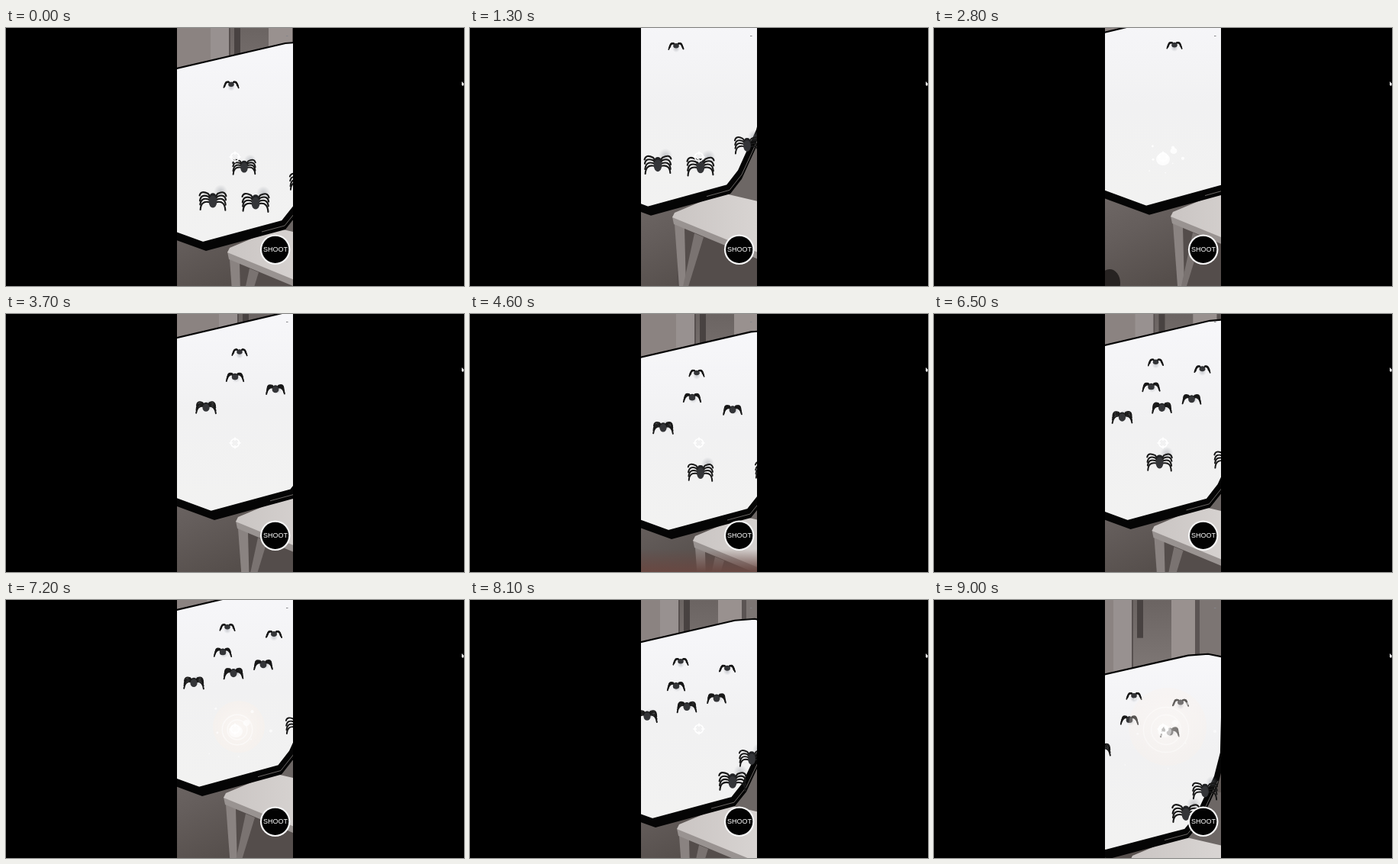
An HTML page with a canvas that plays this animation: 600 by 338 pixels, repeating every 9100 ms.

```html
<!DOCTYPE html>
<html lang="en">
<head>
<meta charset="utf-8">
<title>Spider shoot</title>
<style>
html, body { margin: 0; width: 100%; height: 100%; overflow: hidden; background: #000; }
canvas { display: block; }
</style>
</head>
<body>
<canvas id="stage" width="600" height="338"></canvas>
<script>
const ctx = document.getElementById('stage').getContext('2d');
const LOOP = 9100, STEP = 100;
const AIM = { x: 300, y: 169 };
const INK = '#050505';

// The scene stands still; the hand-held camera pans over it.
const pan = [
  { t: 0, x: 0, y: 0 },
  { t: 1300, x: -25, y: -46 },
  { t: 2800, x: 20, y: -47 },
  { t: 4600, x: 2, y: 3 },
  { t: 5800, x: -4, y: 15 },
  { t: 7200, x: -5, y: -35 },
  { t: 9000, x: -33, y: 47 }
];

const spider = (x, y, from = 0, to = LOOP) => ({ x, y, from, to });
const spiders = [
  spider(295, 74),
  spider(289, 106, 3200),
  spider(342, 122, 3500),
  spider(356, 83, 4900),
  spider(303, 133, 5200, 8700),
  spider(251, 145, 3000),
  spider(312, 181, 0, 600),
  spider(388, 200),
  spider(300, 203, 3800, 7000),
  spider(271, 225, 0, 2700),
  spider(327, 227, 0, 1600),
  spider(363, 230, 8000)
].sort((a, b) => a.y - b.y);
const hits = spiders.map(s => s.to);

const mix = (a, b, u) => a + (b - a) * u;

function camera(t) {
  const i = Math.max(1, pan.findIndex(k => k.t >= t));
  const a = pan[i - 1], b = pan[i], u = (t - a.t) / (b.t - a.t);
  return { x: mix(a.x, b.x, u), y: mix(a.y, b.y, u) };
}

// Far parts of the table slide a little more than near ones.
const place = (cam, x, y) => [x + cam.x, y + cam.y * (1.13 - y * .00045)];

function path(pts, close = true) {
  ctx.beginPath();
  pts.forEach(([x, y], i) => i ? ctx.lineTo(x, y) : ctx.moveTo(x, y));
  if (close) ctx.closePath();
}
function poly(fill, ...pts) { path(pts); ctx.fillStyle = fill; ctx.fill(); }
function rect(fill, x, y, w, h) { ctx.fillStyle = fill; ctx.fillRect(x, y, w, h); }
function oval(fill, x, y, rx, ry = rx) {
  ctx.beginPath();
  ctx.ellipse(x, y, rx, ry, 0, 0, 7);
  ctx.fillStyle = fill;
  ctx.fill();
}
function fade(x0, y0, x1, y1, ...colors) {
  const g = ctx.createLinearGradient(x0, y0, x1, y1);
  colors.forEach((c, i) => g.addColorStop(i / (colors.length - 1), c));
  return g;
}
function glow(x, y, r, color, clear) {
  const g = ctx.createRadialGradient(x, y, 0, x, y, r);
  g.addColorStop(0, color);
  g.addColorStop(1, clear);
  oval(g, x, y, r);
}

function drawWall(cam) {
  const seam = 294 + cam.x;
  rect('#8b8381', 224, 0, 152, 110);
  rect('#989190', seam - 26, 0, 24, 110);
  rect(fade(0, 0, 0, 85, '#6b6462', '#7d7674'), seam, 0, 50, 110);
  rect('#57504f', seam - 2, 0, 2, 110);
  rect('#484241', seam + 5, 0, 8, 45 + cam.y * .1);
  rect('#99918f', seam + 50, 0, 31, 110);
  rect('#5b5453', seam + 81, 0, 6, 110);
  rect('#7c7573', seam + 87, 0, 60, 110);
}

function drawFloor(cam) {
  rect(fade(224, 190, 290, 338, '#736c6a', '#655e5c', '#554e4b'), 224, 150, 152, 188);
  ctx.save();
  ctx.translate(291 + cam.x, 290 + cam.y);
  poly('#6d6765', [50, -30], [75, -85], [150, -85], [150, 0]);
  poly('#544d4b', [8, 14], [150, 70], [150, 120], [4, 120]);
  poly('#8a8381', [2, 13], [15, 18], [17, 95], [8, 95]);
  poly('#7a7371', [28, 25], [40, 30], [20, 95], [13, 95]);
  poly('#999391', [-1, 3], [150, 65], [150, 75], [1, 13]);
  poly(fade(0, 0, 110, 0, '#cac5c3', '#d8d4d2'), [-1, 4], [2, -2], [64, -28], [150, -8], [150, 66]);
  ctx.restore();
}

// Brief shapes that slip into view at the bottom.
function drawPassing(t) {
  const foot = 1 - Math.abs(t - 2800) / 500;
  if (foot > 0) oval('#272322', 230, 342 - 8 * foot, 14, 18);
  const finger = 1 - Math.abs(t - 4600) / 500;
  if (finger > 0) rect(fade(0, 308, 0, 338, 'rgba(105,72,66,0)', `rgba(105,72,66,${finger})`), 224, 308, 152, 30);
}

function drawTable(cam) {
  const p = (x, y) => place(cam, x, y);
  const back = [p(150, 70), p(366, 20), p(392, 18), p(412, 22)];
  const front = [p(409, 150), p(401, 182), p(377, 234), p(362, 253), p(258, 281), p(150, 242)];
  const face = [...back, ...front];
  ctx.lineJoin = 'round';
  poly(INK, ...back, ...front.map(([x, y]) => [x + 4, y + 11]));
  path(face);
  ctx.fillStyle = fade(0, back[1][1], 0, front[4][1], '#f7f7fa', '#f1f1f2', '#f2f2f1');
  ctx.fill();
  ctx.strokeStyle = INK;
  ctx.lineWidth = 2.2;
  ctx.stroke();
  ctx.strokeStyle = '#837e7c';
  ctx.lineWidth = .8;
  path([p(335, 267), p(365, 259), p(381, 239), p(405, 188)], false);
  ctx.stroke();
}

function drawSpider(cam, s, t) {
  const w = 12 + s.y * .108;
  const near = Math.max(0, Math.min(1, (w - 21) / 12));
  const size = (far, close) => mix(far, close, near) * w;
  ctx.save();
  ctx.translate(...place(cam, s.x, s.y));
  glow(size(0, .28), size(.18, -.3), w * .25, 'rgba(130,135,145,.4)', 'rgba(130,135,145,0)');
  ctx.strokeStyle = '#181818';
  ctx.lineCap = 'round';
  ctx.lineWidth = size(.085, .058);
  for (const side of [-1, 1]) {
    for (let i = 0; i < 4; i++) {
      const sway = Math.sin(t / 140 + i * 2.1 + side + s.x) * .02 * w;
      const knee = [side * size(.28 + .03 * i, .3 + .03 * i), size(-.18 + .03 * i, -.3 + .13 * i)];
      const tip = [side * size(.38 + .035 * i, .48 - .01 * i), size(.03 + .06 * i, -.15 + .17 * i) + sway];
      ctx.beginPath();
      ctx.moveTo(side * w * .07, size(-.05, -.08 + .06 * i));
      ctx.lineTo(side * w * .17, size(-.17, -.22 + .1 * i));
      ctx.quadraticCurveTo(side * size(.4, .43), knee[1] - w * .05, ...tip);
      ctx.stroke();
    }
  }
  oval('#202123', 0, size(-.06, -.12), w * .12);
  oval('#343538', 0, size(0, .07), size(.19, .145), size(.15, .22));
  ctx.restore();
}

function drawHit(age) {
  if (age < 0 || age > 500) return;
  const a = age / 100, x = AIM.x + 1 + a, y = AIM.y + 1;
  ctx.save();
  ctx.globalAlpha = 1 - age / 600;
  if (a > 1) {
    const r = 17 * a;
    glow(x + 2, y - 4, r, '#fffaf6', 'rgba(252,240,231,.5)');
    ctx.strokeStyle = 'rgba(255,255,255,.8)';
    ctx.lineWidth = 1.5;
    for (const part of [.38, .58]) {
      ctx.beginPath();
      ctx.arc(x, y, r * part, 0, 7);
      ctx.stroke();
    }
  }
  if (a > 0) {
    oval('#fff', x - 2, y + 2, 9, 8);
    oval('#fff', x + 12, y - 9, 4.5, 4);
  }
  for (let i = 0; i < 7; i++) {
    const turn = i * 2.4 + .6, d = 4 + a * (9 + i * 2.2);
    oval('#fff', x + Math.cos(turn) * d, y + Math.sin(turn) * d, .9 + i % 3 * .6);
  }
  ctx.restore();
}

function drawAim() {
  ctx.save();
  ctx.translate(AIM.x, AIM.y);
  ctx.strokeStyle = '#fff';
  ctx.lineWidth = 1.6;
  ctx.beginPath();
  ctx.arc(0, 0, 5.5, 0, 7);
  ctx.stroke();
  for (let i = 0; i < 4; i++) {
    ctx.rotate(Math.PI / 2);
    path([[3, 0], [7.5, 0]], false);
    ctx.stroke();
  }
  ctx.restore();
}

function drawButton() {
  oval('#f5f5f5', 352.7, 290.3, 19.8);
  oval('#020202', 352.7, 290.3, 17.6);
  ctx.font = '9px "Liberation Sans", Arial, sans-serif';
  ctx.textAlign = 'center';
  ctx.fillStyle = '#fff';
  ctx.fillText('SHOOT', 352.9, 293.4);
}

function draw(t) {
  const cam = camera(t);
  rect('#000', 0, 0, 600, 338);
  ctx.save();
  ctx.beginPath();
  ctx.rect(224, 0, 152, 338);
  ctx.clip();
  drawWall(cam);
  drawFloor(cam);
  drawPassing(t);
  drawTable(cam);
  for (const s of spiders) if (t >= s.from && t < s.to) drawSpider(cam, s, t);
  for (const h of hits) drawHit(t - h);
  drawHit(t - 9000);
  drawAim();
  rect('#85858a', 367, 10, 2.5, 1);
  drawButton();
  ctx.restore();
  poly('#e8e8e8', [597, 70], [597, 75], [599, 76], [600, 73]);
}

const start = performance.now();
function tick() {
  const t = (performance.now() - start) % LOOP;
  draw(Math.floor(t / STEP) * STEP);
  requestAnimationFrame(tick);
}
tick();
</script>
</body>
</html>
```
